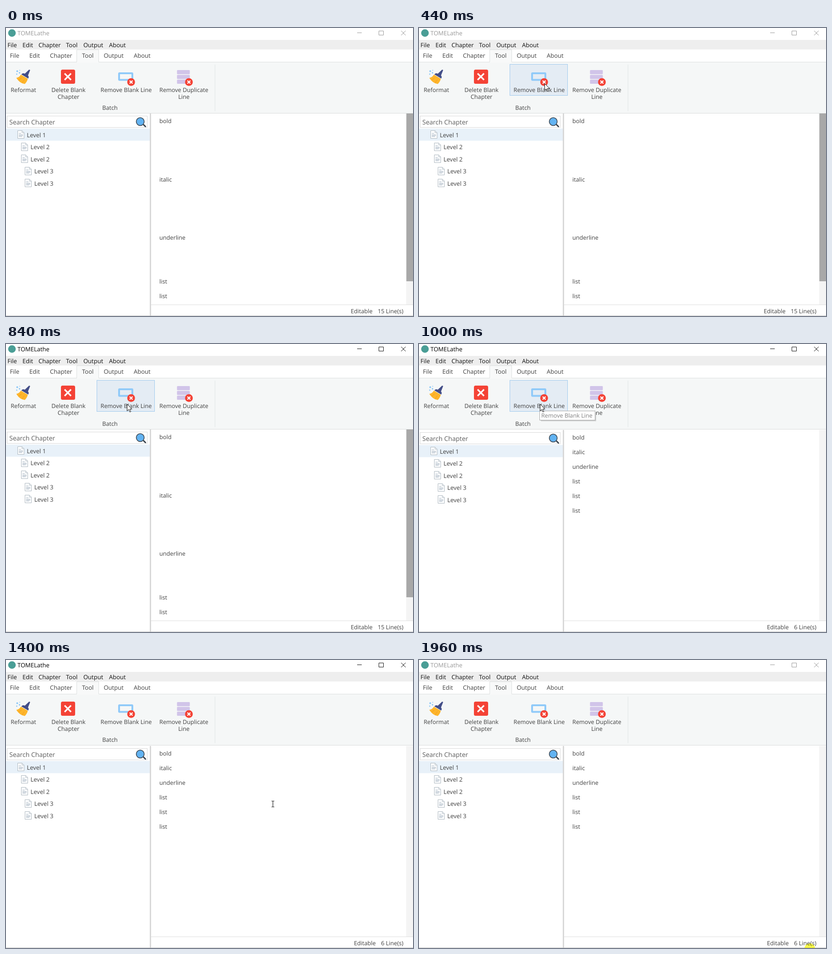
Recreate the animation shown at these times as an HTML page. Size 889 px wide and 630 px high, loop 2000 ms.

```html
<!DOCTYPE html>
<html lang="en">
<head>
<meta charset="utf-8">
<title>TOMELathe</title>
<style>
html, body { margin: 0; width: 100%; height: 100%; overflow: hidden; background: #fff; }
svg { display: block; }
text { font-family: "Open Sans", "Noto Sans", sans-serif; font-size: 12.7px; fill: #404040; text-rendering: geometricPrecision; white-space: pre; }
.mid { text-anchor: middle; }
.menu { fill: #111; }
.hint { fill: #5c5c5c; }
.hover { fill: #e4ecf4; stroke: #9fcaee; }
.frame { fill: none; stroke: #dcdfdf; }
</style>
</head>
<body>
<svg width="889" height="630" viewBox="0 0 889 630">
  <defs>
    <g id="cross">
      <circle r="8.5" fill="#f44336"/>
      <path d="M-3.2-3.2 3.2 3.2M3.2-3.2-3.2 3.2" stroke="#fff" stroke-width="2.3"/>
    </g>
    <g id="page" fill="none" stroke="#aeb8c0">
      <path d="M.5.5H10L14.5 5V17.5H.5Z" fill="#fcfdfe"/>
      <path d="M10 .5V5H14.5"/>
      <path d="M3 6.5H8M3 9.5H12M3 11.5H12M3 13.5H10" stroke="#a9b6c3"/>
    </g>
  </defs>
  <rect width="889" height="630" fill="#fff"/>

  <circle cx="13" cy="11" r="8.3" fill="#4a9e96"/>
  <g id="buttons" fill="none">
    <path d="M767 10.5H777M814.5 6.5H824.5V15.5H814.5ZM863 6 873 16M873 6 863 16"/>
  </g>
  <rect y="26" width="889" height="21" fill="#eee"/>

  <rect y="47" width="889" height="28" fill="#fff"/>
  <rect y="75" width="889" height="111" fill="#f5f7f7"/>
  <path class="frame" d="M0 74.5H154.5V47.5H202.5V74.5H889"/>
  <rect x="155" y="48" width="47" height="28" fill="#f8f9f9"/>
  <path d="M456.5 80V182" stroke="#e1e4e4"/>
  <path d="M0 186.5H889" stroke="#d9dcdc"/>

  <rect id="hoverBlank" class="hover" x="198.5" y="79.5" width="126" height="68"/>
  <rect id="hoverDup" class="hover" x="324.5" y="79.5" width="126" height="84"/>

  <g id="broom">
    <path d="M50.5 91 52.8 92 48 104Q51 106.5 48.5 110.5L33.5 101.5Q37 97.5 41 100Z" fill="#434e88"/>
    <path d="M32.5 102 47.5 111Q46.5 117 41 122.5 29.5 121 22.5 109 29 108 32.5 102Z" fill="#fdb52c"/>
    <path d="M28 114 34 109M35 120 40 113" stroke="#f7a21f" stroke-width="1.2"/>
    <g fill="#8fc8f6">
      <circle cx="24.5" cy="94.5" r="2"/><circle cx="29.5" cy="98" r="1.7"/>
      <circle cx="23.5" cy="101" r="1.4"/><circle cx="30" cy="92.5" r="1"/>
    </g>
  </g>
  <rect x="120" y="91" width="31" height="31" rx="3.5" fill="#f44336"/>
  <path d="M128 99.5 142 113.5M142 99.5 128 113.5" stroke="#fff" stroke-width="3.4"/>
  <rect x="247" y="99" width="29" height="14.5" rx="1" fill="none" stroke="#90caf9" stroke-width="4"/>
  <use href="#cross" x="273.3" y="118.3"/>
  <g fill="#d1c4e9">
    <rect x="373.5" y="92" width="28" height="9" rx="1.5"/>
    <rect x="373.5" y="102.5" width="28" height="9" rx="1.5"/>
    <rect x="373.5" y="113" width="28" height="9" rx="1.5"/>
  </g>
  <use href="#cross" x="399.5" y="118.3"/>
  <g id="labels"></g>

  <g id="body">
    <rect x="2.5" y="192.5" width="306" height="25" fill="#fff" stroke="#d8d8d8"/>
    <path d="M299 210 304.5 215.5" stroke="#39444e" stroke-width="3" stroke-linecap="round"/>
    <circle cx="293.2" cy="204.8" r="8.6" fill="#62b3f2" stroke="#46525e" stroke-width="1.8"/>
    <rect y="220" width="314" height="26.5" fill="#e8f1f9"/>
    <g id="tree"></g>
    <rect x="314" y="187" width="3" height="445" fill="#d8d8d8"/>
    <rect x="874" y="187" width="15" height="418" fill="#f4f4f4"/>
    <rect id="thumb" x="874.5" y="187" width="14.5" height="367" fill="#a8a8a8"/>
  </g>
  <g id="before"></g>
  <g id="after"></g>
  <rect x="317" y="605" width="572" height="24" fill="#fff"/>
  <path d="M317 605.5H889" stroke="#dedede"/>
  <path d="M0 629.5H889" stroke="#c4c4c4"/>
  <g id="status"></g>

  <g id="tip">
    <rect x="266" y="149" width="121" height="20" rx="1" fill="#000" opacity=".16"/>
    <rect x="263.5" y="146.5" width="121" height="20" fill="#fff" stroke="#aaa"/>
  </g>
  <circle id="click" cx="853.5" cy="631.6" r="11.8" fill="#ffff4a" style="mix-blend-mode:multiply"/>
  <path id="arrow" d="M.5.5V15.5L4 12.2 6.5 17.8 8.8 16.8 6.4 11.4H11Z" fill="#fff" stroke="#111"/>
  <path id="beam" d="M-3-6.5H-1L0-5.8 1-6.5H3M0-6V6M-3 6.5H-1L0 5.8 1 6.5H3" fill="none" stroke="#222" stroke-width="1.2"/>
</svg>
<script>
const LOOP = 2000, TICK = 40;
const $ = id => document.getElementById(id);

// Adds a line of text whose capitals are centred on y.
function put(parent, x, y, str, cls = "", size = 12.7) {
  const el = document.createElementNS("http://www.w3.org/2000/svg", "text");
  el.setAttribute("x", x);
  el.setAttribute("y", Math.round(y + size * 0.36));
  el.setAttribute("class", cls);
  el.style.fontSize = size + "px";
  el.textContent = str;
  return $(parent).appendChild(el);
}

const title = put("labels", 25, 11, "TOMELathe", "", 13);
const menu = ["File", "Edit", "Chapter", "Tool", "Output", "About"];
[3.2, 36, 71, 131, 169, 225].forEach((x, i) => put("labels", x, 37, menu[i], "menu", 13));
[8.5, 51, 96, 166, 213.5, 279].forEach((x, i) => put("labels", x, 60, menu[i], "", 13));

[[38, 135, "Reformat"], [136.5, 135, "Delete Blank"], [136.5, 150.5, "Chapter"],
 [262.5, 135, "Remove Blank Line"], [388.5, 135, "Remove Duplicate"],
 [388.5, 150.5, "Line"], [227, 174, "Batch"]
].forEach(([x, y, str]) => put("labels", x, y, str, "mid"));

put("body", 7.3, 205.5, "Search Chapter", "hint", 14);
[1, 2, 2, 3, 3].forEach((level, i) => {
  const x = 17 + level * 8.2, y = 234 + i * 26.6;
  const icon = document.createElementNS("http://www.w3.org/2000/svg", "use");
  icon.setAttribute("href", "#page");
  icon.setAttribute("x", Math.floor(x));
  icon.setAttribute("y", Math.round(y - 10));
  $("tree").append(icon);
  put("tree", x + 20.2, y, "Level " + level, "", 13);
});

[["bold", 203], ["italic", 331], ["underline", 458.5], ["list", 554.5], ["list", 586.5]]
  .forEach(([str, y]) => put("before", 335, y, str));
["bold", "italic", "underline", "list", "list", "list"]
  .forEach((str, i) => put("after", 335, 204.5 + i * 32, str));

const mode = put("status", 753, 619, "Editable");
const count = put("status", 868, 619, "");
count.style.textAnchor = "end";
const tipText = put("tip", 267, 156.5, "Remove Blank Line");

// Pointer: [time, x, y, shape]
const pointer = [
  [0, 0, 0, ""],
  [160, 372, 32, "arrow"], [200, 352, 52, "arrow"], [240, 330, 71, "arrow"],
  [280, 310, 88, "arrow"], [320, 295, 102, "arrow"], [360, 284, 112, "arrow"],
  [400, 277, 118, "arrow"], [440, 274, 121, "arrow"],
  [680, 272, 123, "arrow"], [720, 269, 126, "arrow"], [760, 266, 129, "arrow"],
  [800, 264, 131, "arrow"],
  [1120, 279, 135, "arrow"], [1160, 318, 145, "arrow"], [1200, 355, 154, "arrow"],
  [1240, 412, 190, "beam"], [1280, 483, 243, "beam"], [1320, 540, 284, "beam"],
  [1360, 573, 308, "beam"], [1400, 583, 315, "beam"],
  [1520, 591, 322, "beam"], [1560, 618, 350, "beam"], [1600, 662, 399, "beam"],
  [1640, 716, 463, "beam"], [1680, 768, 526, "beam"], [1720, 808, 575, "beam"],
  [1760, 833, 602, "beam"],
  [1800, 846, 618, "arrow"], [1840, 0, 0, ""]
];

const show = (el, on) => { el.style.display = on ? "" : "none"; };

function draw(now) {
  const t = Math.floor((now % LOOP) / TICK) * TICK;
  const within = (a, b) => t >= a && t < b;
  const active = within(840, 1880), cleaned = t >= 920;

  title.style.fill = active ? "#000" : "#999";
  $("buttons").style.stroke = active ? "#111" : "#999";

  show($("hoverBlank"), within(280, 1200));
  show($("hoverDup"), within(1200, 1240));
  show($("tip"), within(1000, 1120));
  tipText.style.fill = t < 1040 ? "#808080" : "#575757";

  $("body").setAttribute("transform", `translate(0 ${cleaned ? 1 : 0})`);
  show($("thumb"), !cleaned);
  show($("before"), !cleaned);
  show($("after"), cleaned);
  mode.setAttribute("x", cleaned ? 760 : 753);
  count.textContent = (cleaned ? 6 : 15) + " Line(s)";
  show($("click"), t >= 1960);

  const [, x, y, shape] = pointer.findLast(step => step[0] <= t);
  for (const id of ["arrow", "beam"]) {
    show($(id), id === shape);
    $(id).setAttribute("transform", `translate(${x} ${y})`);
  }
}

function loop() {
  draw(performance.now());
  requestAnimationFrame(loop);
}
loop();
</script>
</body>
</html>
```
